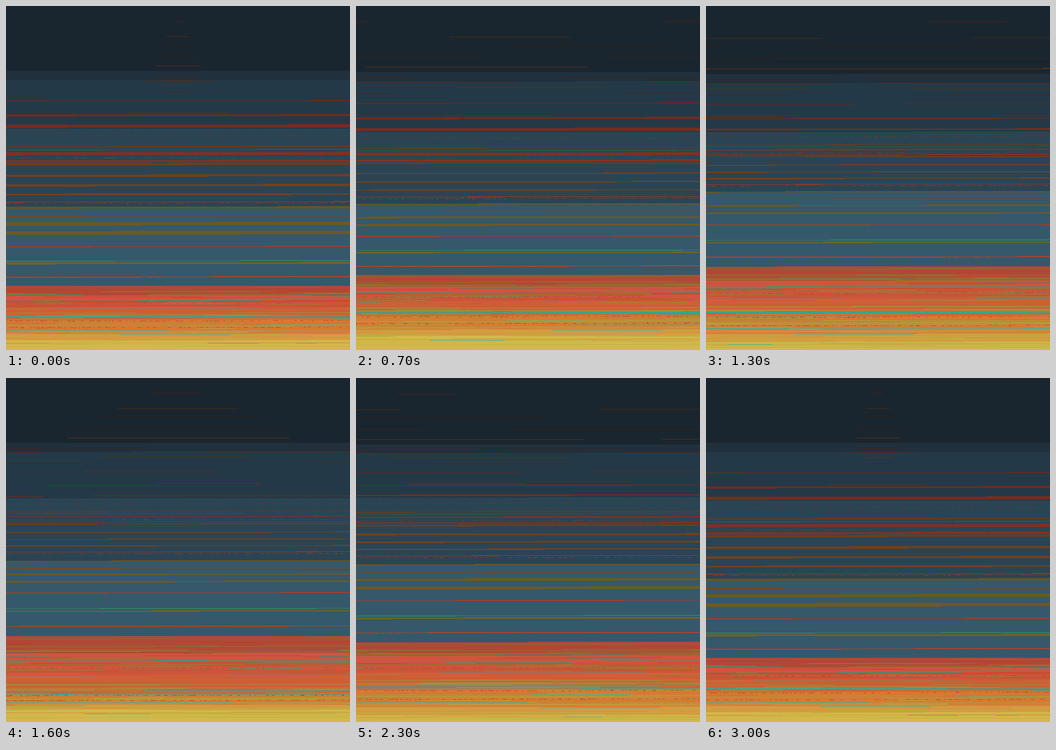
Recreate the animation shown at these times as an HTML page with a canvas. Size 600 by 600 pixels, loop 3100 ms.

```html
<!DOCTYPE html>
<html lang="en">
<head>
<meta charset="utf-8">
<title>Sorted dusk</title>
<style>
  html, body { margin: 0; width: 100%; height: 100%; overflow: hidden; background: #1a262f; }
  canvas { display: block; }
</style>
</head>
<body>
<canvas id="stage" width="600" height="600"></canvas>
<script>
const SIZE = 600, LOOP = 3100, STEP = 100;
const ctx = document.getElementById('stage').getContext('2d');

// Every track holds its resting value first, then one value for each later key time
const keyTimes = [0, 700, 1100, 1600, 2000, 2600, 3000];

// Heights of the main brightness levels
const levels = [
  [0],
  [113, 115, 122, 113, 121, 111],
  [214, 220, 226, 210, 217, 200],
  [340, 331, 314, 301, 314, 301],
  [352, 346, 328, 320, 331, 322],
  [419, 401, 386, 374, 389, 386],
  [488, 469, 457, 450, 459, 462],
  [543, 536, 527, 549, 525, 551],
  [583, 575, 590, 578, 592, 583],
  [SIZE]
];

// How strongly the dark, red and golden stripes show
const shade = [.1, .5, 1, .5, 1, .2];
const glow = [1, 1, .6, .1, .7, .15];
const gold = [1, .4, .3, .3, .4, 1];

const bands = [
  [0, '#1a262f'], [113, '#20303c'], [129, '#243947'], [214, '#2b4454'],
  [352, '#35586b'], [488, '#ad4a38'], [505, '#d0543f'], [526, '#cf5f38'],
  [546, '#d57a35'], [572, '#d69a40'], [583, '#d4b84a'], [SIZE]
];

// Lightness grows with height; stripes are widest around the peak
const tones = {
  dim: { hue: 8, sat: 30, light: 12, gain: .05, size: 0, peak: 0, power: shade, lines: [66, 87, 122, 149] },
  red: { hue: 9, sat: 57, light: 18, gain: .053, size: 6, peak: 230, power: glow,
    lines: [26, 129, 165, 190, 209, 257, 270, 341, 419, 472] },
  brown: { hue: 26, sat: 60, light: 16, gain: .038, size: 3.5, peak: 285, power: gold,
    lines: [53, 104, 186, 245, 275, 295, 312, 328, 366] },
  olive: { hue: 46, sat: 50, light: 13, gain: .038, size: 5, peak: 395, power: gold,
    lines: [138, 351, 379, 395, 448] },
  teal: { hue: 162, sat: 45, light: 13, gain: .048, size: 1, peak: 250, power: glow, lines: [250, 444] }
};
const tint = (name, y) => {
  const { hue, sat, light, gain } = tones[name];
  return `hsl(${hue} ${sat}% ${light + y * gain}%)`;
};
const bell = (y, middle, spread) => Math.exp(-(((y - middle) / spread) ** 2));

function randomFrom(seed) {
  return () => {
    seed = (seed * 1664525 + 1013904223) >>> 0;
    return seed / 4294967296;
  };
}

// Thin threads of the warm floor: red turning to orange and gold, with olive and teal between
const rnd = randomFrom(41);
const threads = Array.from({ length: 120 }, () => {
  const y = 489 + rnd() * 105, depth = (y - 489) / 105, kind = rnd();
  const rows = .2 + 1.5 * rnd() ** 2;
  if (kind < .13) return { y, rows, color: `hsl(164 42% ${38 + 14 * depth}%)` };
  if (kind < .45) return { y, rows, olive: true, color: `hsl(${38 + 16 * depth} 52% ${36 + 16 * depth}%)` };
  return { y, rows, color: `hsl(${8 + 36 * depth ** 1.5} 60% ${45 + 10 * depth}%)` };
});

// Fills consecutive pixels in reading order, wrapping at the right edge
function run(top, rows, color) {
  let at = Math.round(top * SIZE);
  const end = Math.min(at + Math.round(rows * SIZE), SIZE * SIZE);
  ctx.fillStyle = color;
  while (at < end) {
    const x = at % SIZE, width = Math.min(SIZE - x, end - at);
    ctx.fillRect(x, Math.floor(at / SIZE), width, 1);
    at += width;
  }
}

function dashes(top, rows, color, random) {
  for (let y = top; y < top + rows; y += (4 + random() * 18) / SIZE) {
    run(y, (1 + random() * 5) / SIZE, color);
  }
}

function draw(time) {
  const k = keyTimes.findLastIndex(key => key <= time);
  const part = (time - keyTimes[k]) / ((keyTimes[k + 1] ?? LOOP) - keyTimes[k]);
  const value = track => {
    const from = track[k] ?? track[0], to = track[k + 1] ?? track[0];
    return from + (to - from) * part;
  };
  const heights = levels.map(value);

  function place(y) {
    const i = Math.max(1, levels.findIndex(level => level[0] >= y));
    const low = levels[i - 1][0], high = levels[i][0];
    return heights[i - 1] + (heights[i] - heights[i - 1]) * (y - low) / (high - low);
  }

  bands.slice(0, -1).forEach(([y, color], i) => {
    const top = place(y);
    run(top, place(bands[i + 1][0]) - top, color);
  });

  for (const { y, rows, color, olive } of threads) {
    run(place(y), olive ? rows * (.4 + 1.4 * value(shade)) : rows, color);
  }
  // Teal seam between red and orange
  run(place(541), 1.5 + 2 * value(shade), '#3ba48a');

  for (const [name, { size, peak, power, lines }] of Object.entries(tones)) {
    for (const y of lines) {
      const rows = Math.max(0, (y - 150) / 180)
        + 1.3 * value(shade) * bell(y, 100, 60)
        + size * value(power) * bell(y, peak, 50);
      run(place(y + .5) - rows / 2, rows, tint(name, y));
    }
  }

  // Broken lines flicker where neighbouring levels mix
  const random = randomFrom(time + 7);
  for (const y of [225, 264, 343, 472, 519, 548, 560]) {
    for (const name of y < 300 ? ['teal', 'red'] : ['olive', 'red']) {
      dashes(place(y) + random(), .8, tint(name, y), random);
    }
  }
}

let shown = -1;
function tick() {
  const time = Math.floor(performance.now() % LOOP / STEP) * STEP;
  if (time !== shown) draw(shown = time);
  requestAnimationFrame(tick);
}
tick();
</script>
</body>
</html>
```
